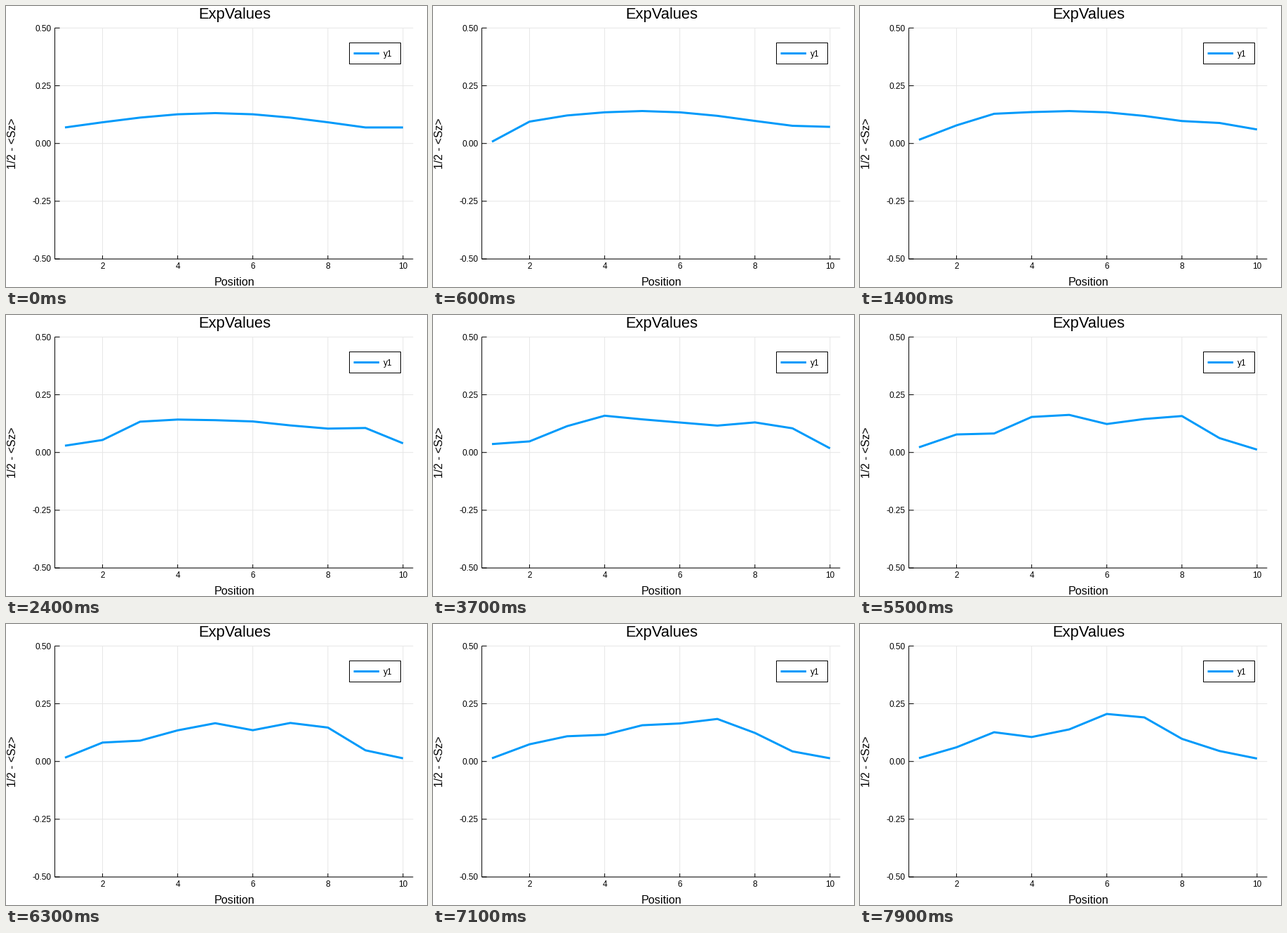
A matplotlib script that plays this animation: 600 px wide and 400 px high, repeating every 8000 ms.

```python
import numpy as np
import matplotlib.pyplot as plt
from matplotlib.animation import FuncAnimation
from matplotlib.patches import Rectangle

W, H, DPI = 600, 400, 100
FRAMES, STEP_MS = 80, 100
BLUE, GRID = "#009afa", "#e6e6e6"
LEFT, RIGHT, TOP, BOTTOM = 69.6, 580.3, 31.3, 360.1
SITES = np.arange(1, 11)
RATE = 0.032       # hopping phase per frame
WEAKEN = 0.285     # what the measurement leaves of the first amplitude

plt.rcParams["font.family"] = "Liberation Sans"


def px(size):
    return size * 72 / DPI


def to_x(pos):
    return LEFT + (pos - 0.73) / 9.54 * (RIGHT - LEFT)


def to_y(value):
    return TOP + (0.5 - value) * (BOTTOM - TOP)


def unit(state):
    return state / np.linalg.norm(state)


# One spin excitation on an open chain: a Gaussian packet whose first site is
# weakly measured and which then spreads by nearest neighbour hopping.
packet = unit(np.exp(-np.minimum(np.abs(SITES - 5), 4) ** 2 / 50))
measured = unit(np.where(SITES == 1, WEAKEN, 1) * packet)
energy, modes = np.linalg.eigh(np.eye(10, k=1) + np.eye(10, k=-1))


def values(i):
    if i == 0:
        return packet ** 2
    phase = np.exp(1j * energy * RATE * (i - 1))
    return np.abs(modes @ (phase * (modes.T @ measured))) ** 2


fig = plt.figure(figsize=(W / DPI, H / DPI), dpi=DPI, facecolor="white")
ax = fig.add_axes([0, 0, 1, 1])
ax.set_xlim(0, W)
ax.set_ylim(H, 0)
ax.axis("off")


def stroke(xs, ys, color="black", width=1, z=2):
    return ax.plot(xs, ys, color=color, lw=px(width), zorder=z,
                   solid_capstyle="butt", snap=False)[0]


def label(x, y, text, size, **kw):
    ax.text(x, y, text, fontsize=px(size), color="black", zorder=5,
            **{"ha": "center", "va": "baseline", **kw})


for pos in range(2, 11, 2):
    x = to_x(pos)
    stroke([x, x], [TOP, BOTTOM], GRID, z=1)
    stroke([x, x], [BOTTOM, BOTTOM - 5])
    label(x, 374, str(pos), 11.8)

for value in np.linspace(-0.5, 0.5, 5):
    y = to_y(value)
    stroke([LEFT, RIGHT], [y, y], GRID, z=1)
    stroke([LEFT, LEFT + 7], [y, y])
    label(65, y + 4.2, f"{value:.2f}".replace("\u2212", "-"), 11.9, ha="right")

stroke([LEFT, LEFT], [TOP, BOTTOM])
stroke([LEFT, RIGHT], [BOTTOM, BOTTOM])

label(325.5, 18, "ExpValues", 21.9)
label(325.3, 398, "Position", 16.3)
label(14.5, 195.7, "1/2 - <Sz>", 15.8, rotation=90, rotation_mode="anchor")

curve = stroke(to_x(SITES), to_y(values(0)), BLUE, 3, z=3)

ax.add_patch(Rectangle((489.5, 52.5), 73, 30, fc="white", ec="black",
                       lw=px(1), zorder=4, snap=False))
stroke([495.5, 532], [67.5, 67.5], BLUE, 3, z=5)
label(538, 72, "y1", 11.9, ha="left")


def draw(i):
    curve.set_ydata(to_y(values(i)))
    return (curve,)


anim = FuncAnimation(fig, draw, frames=FRAMES, interval=STEP_MS, repeat=True,
                     repeat_delay=0, blit=False)
plt.show()
```
